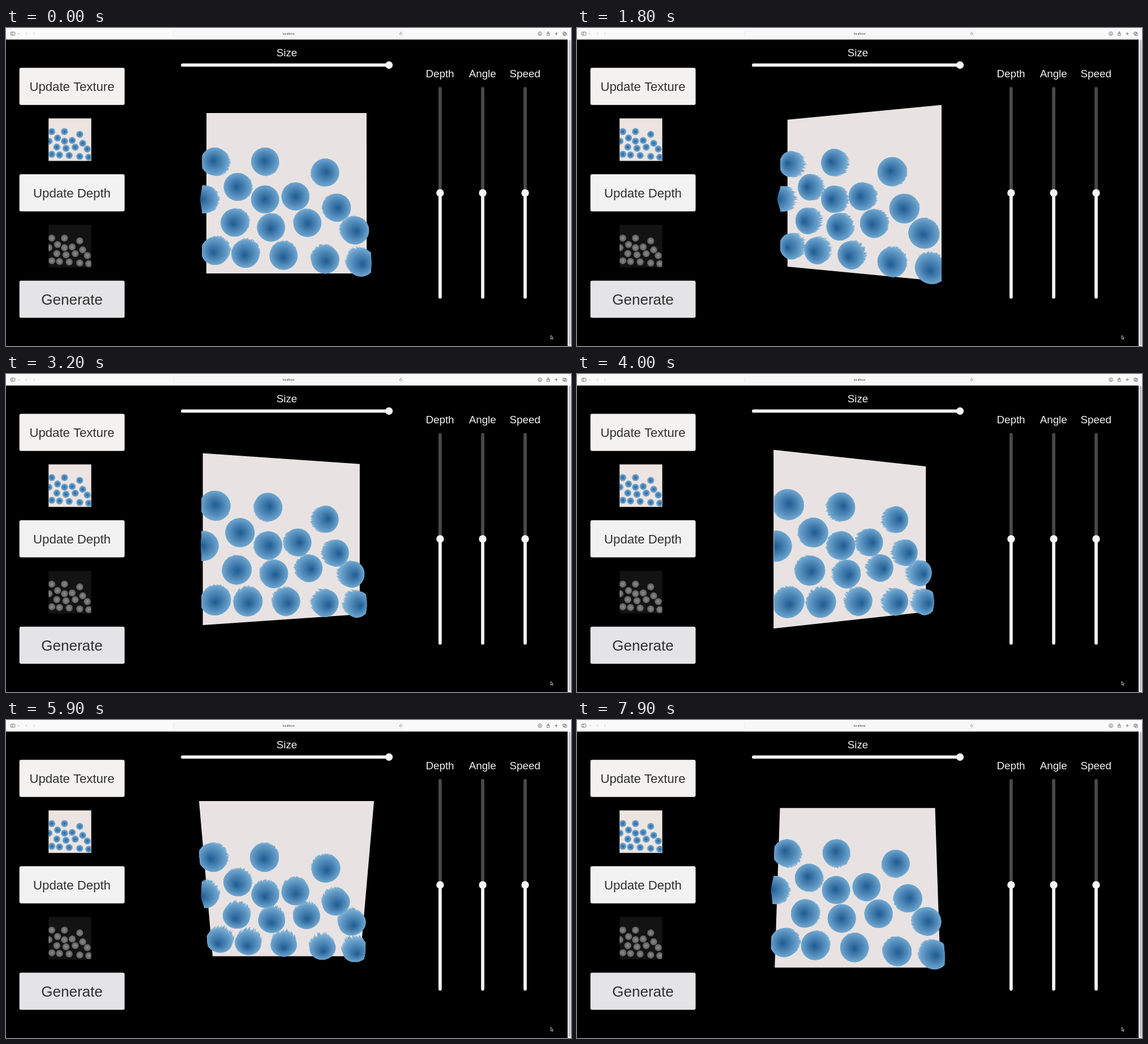
An HTML page with a canvas for the animation above (8000 ms loop, 998x561 px).

```html
<!DOCTYPE html>
<html lang="en">
<head>
<meta charset="utf-8">
<title>Depth viewer</title>
<style>
html, body { margin: 0; width: 998px; height: 561px; overflow: hidden; background: #000; }
canvas { display: block; width: 998px; height: 561px; }
</style>
</head>
<body>
<canvas id="stage" width="998" height="561"></canvas>
<script>
const ctx = document.getElementById('stage').getContext('2d');
const LOOP = 8000, STEP = 100;
const CX = 495.5, CY = 291.4;   // projection centre
const HALF = 141.5, CAM = 468;  // plane half size, camera distance
const R = 23.4, RIM = 23, TOP = 35;
const SWING = 20, PERIOD = 5000, START = 148;
const RINGS = 18, SIDES = 96;
const INNER = [30, 90, 145], OUTER = [108, 164, 206];
const FONT = '"Liberation Sans", Arial, sans-serif';

// dot centres on the plane, relative to its middle
const DOTS = [
  [-36, -53], [-120.5, -53], [65, -34.6], [-82, -10.5], [-139, 10.5],
  [-36, 10.5], [15, 5.5], [84.6, 24.4], [-87, 49.5], [-26, 57.7],
  [35, 50], [115, 62.6], [-120, 97], [-69, 101.7], [-5, 105],
  [65, 111.4], [125, 116.3]
];

const rad = d => d * Math.PI / 180;
const clamp = v => Math.max(-HALF, Math.min(HALF, v));
const mix = (a, b, k) => `rgb(${a.map((v, i) => Math.round(v + (b[i] - v) * k))})`;
const noise = n => { const s = Math.sin(n * 12.9898) * 43758.5453; return s - Math.floor(s); };

function pose(t) {
  const swing = from => rad(SWING) * Math.sin((t - from) / PERIOD * 2 * Math.PI);
  if (t < START) return { yaw: 0, pitch: rad(-0.2) };
  if (t < START + PERIOD) return { yaw: swing(START), pitch: 0 };
  return { yaw: 0, pitch: swing(START + PERIOD) };
}

// returns a function mapping plane coordinates to [screen x, screen y, nearness]
function projector({ yaw, pitch }) {
  const cy = Math.cos(yaw), sy = Math.sin(yaw);
  const cp = Math.cos(pitch), sp = Math.sin(pitch);
  return (x, y, z) => {
    const x1 = x * cy - z * sy, z1 = x * sy + z * cy;
    const y1 = y * cp + z1 * sp, z2 = z1 * cp - y * sp;
    const k = CAM / (CAM - z2);
    return [CX + x1 * k, CY + y1 * k, z2];
  };
}

function trace(points) {
  points.forEach(([x, y], i) => i ? ctx.lineTo(x, y) : ctx.moveTo(x, y));
  ctx.closePath();
}

function fillPoly(points, color) {
  ctx.beginPath();
  trace(points);
  ctx.fillStyle = color;
  ctx.fill();
}

function rimPoint([x, y], r, i) {
  const a = i / SIDES * 2 * Math.PI;
  return [clamp(x + r * Math.cos(a)), clamp(y + r * Math.sin(a))];
}

// ragged side wall hanging from the rim of a dot
function skirt(dot, project, seed, low, high, color) {
  ctx.beginPath();
  for (let i = 0; i < SIDES; i++) {
    const z = RIM * (low + (high - low) * noise(seed * 101 + i));
    const a = rimPoint(dot, R, i), b = rimPoint(dot, R, i + 1);
    trace([project(...a, RIM), project(...b, RIM), project(...b, z), project(...a, z)]);
  }
  ctx.fillStyle = color;
  ctx.fill();
}

function drawDot(dot, project, seed) {
  skirt(dot, project, seed, 0.15, 0.75, '#a3c1d8');
  skirt(dot, project, seed, 0.35, 0.95, '#74a8cf');
  for (let n = 0; n < RINGS; n++) {
    const k = 1 - n / RINGS;
    const z = TOP + (RIM - TOP) * k;
    const ring = [];
    for (let i = 0; i < SIDES; i++) ring.push(project(...rimPoint(dot, R * k, i), z));
    fillPoly(ring, mix(INNER, OUTER, k));
  }
}

function drawRelief(t) {
  const project = projector(pose(t));
  const corners = [[-1, -1], [1, -1], [1, 1], [-1, 1]];
  fillPoly(corners.map(([x, y]) => project(x * HALF, y * HALF, 0)), '#e8e3e2');
  DOTS.map((dot, i) => ({ dot, i, near: project(...dot, 0)[2] }))
    .sort((a, b) => a.near - b.near)
    .forEach(({ dot, i }) => drawDot(dot, project, i + 1));
}

function box(x, y, w, h, r, color) {
  ctx.beginPath();
  ctx.roundRect(x, y, w, h, r);
  ctx.fillStyle = color;
  ctx.fill();
}

function disc(x, y, r, color) {
  ctx.beginPath();
  ctx.arc(x, y, r, 0, 2 * Math.PI);
  ctx.fillStyle = color;
  ctx.fill();
}

function label(str, x, y, size, color) {
  ctx.font = `${size}px ${FONT}`;
  ctx.textAlign = 'center';
  ctx.fillStyle = color;
  ctx.fillText(str, x, y);
}

function line(points, color, width = 0.8) {
  ctx.beginPath();
  points.forEach(([x, y], i) => i ? ctx.lineTo(x, y) : ctx.moveTo(x, y));
  ctx.strokeStyle = color;
  ctx.lineWidth = width;
  ctx.stroke();
}

function button(str, y, size, base, color) {
  box(23.7, y, 185.8, 65.5, 3, color);
  label(str, 116.5, base, size, '#303030');
}

function thumb(y, back, inner, outer) {
  const k = 75.4 / (2 * HALF);
  ctx.save();
  ctx.beginPath();
  ctx.rect(75.2, y, 75.4, 75.2);
  ctx.clip();
  ctx.fillStyle = back;
  ctx.fillRect(75, y, 76, 76);
  for (const [dx, dy] of DOTS) {
    const x = 112.9 + dx * k, cy = y + 37.6 + dy * k;
    const g = ctx.createRadialGradient(x, cy, 0, x, cy, R * k);
    g.addColorStop(0, inner);
    g.addColorStop(1, outer);
    disc(x, cy, R * k, g);
  }
  ctx.restore();
}

function slider(str, x) {
  label(str, x - 0.3, 87.2, 18.8, '#f2f2f2');
  box(x - 2.9, 104, 5.8, 190, 2.9, '#4b484b');
  box(x - 2.9, 291, 5.8, 186.5, 2.9, '#f3f1f1');
  disc(x, 291, 6.7, '#f6f4f4');
}

function drawBrowser() {
  const ink = '#5c5c5c', pale = '#b9b9b9';
  ctx.fillStyle = '#fbfafa';
  ctx.fillRect(0, 0, 998, 20.4);
  box(295, 4.5, 407.5, 11, 3, '#e9e8ea');
  box(295.6, 5.1, 406.3, 9.8, 2.6, '#f8f7f8');
  label('localhost', 499, 11.9, 5.2, '#444');
  ctx.strokeStyle = ink;
  ctx.lineWidth = 0.8;
  ctx.beginPath();
  ctx.roundRect(8.4, 7.2, 7.4, 5.6, 1);
  ctx.roundRect(983.8, 7.2, 4.6, 4.6, 0.8);
  ctx.roundRect(985.6, 8.6, 4.6, 4.6, 0.8);
  ctx.rect(955.6, 9, 4.4, 4.2);
  ctx.moveTo(946.3, 10);
  ctx.arc(943, 10, 3.3, 0, 2 * Math.PI);
  ctx.stroke();
  line([[11, 7.2], [11, 12.8]], ink);
  line([[21.4, 9.5], [22.6, 10.8], [23.8, 9.5]], ink, 0.6);
  line([[37.2, 7.4], [34.6, 10], [37.2, 12.6]], pale);
  line([[48.4, 7.4], [51, 10], [48.4, 12.6]], pale);
  line([[943, 8], [943, 11.6]], ink);
  line([[941.6, 10.4], [943, 11.8], [944.4, 10.4]], ink, 0.6);
  line([[957.8, 11], [957.8, 6.4]], ink);
  line([[956.4, 7.6], [957.8, 6.2], [959.2, 7.6]], ink, 0.6);
  line([[969.2, 10], [974.8, 10]], ink);
  line([[972, 7.2], [972, 12.8]], ink);
  ctx.beginPath();
  ctx.arc(697.3, 10.2, 2, -0.6, 4.8);
  ctx.lineWidth = 0.6;
  ctx.stroke();
  line([[697, 7.3], [698.2, 8.3], [697, 9.2]], ink, 0.6);
  ctx.fillStyle = '#f4f3f3';
  ctx.fillRect(992, 20, 6, 541);
  box(993.7, 21, 3.5, 538, 1.7, '#c2c1c2');
}

function drawCursor() {
  ctx.beginPath();
  trace([[962.2, 542.2], [962.2, 548.6], [963.6, 547.3], [964.6, 549.4],
         [965.6, 548.9], [964.7, 546.9], [966.5, 546.8]]);
  ctx.fillStyle = '#000';
  ctx.fill();
  ctx.strokeStyle = '#e8e8e8';
  ctx.lineWidth = 0.8;
  ctx.stroke();
}

function drawPanel() {
  button('Update Texture', 70.2, 22.1, 111, '#f3f2f1');
  thumb(159.3, '#ebe4e0', '#2363a0', '#7badd3');
  button('Update Depth', 258, 22.2, 299, '#f3f2f2');
  thumb(347.2, '#131313', '#8e8e8e', '#5c5c5c');
  button('Generate', 445.8, 26, 488, '#e4e3e5');
  label('Size', 496, 49.5, 18.8, '#f2f2f2');
  box(309, 62.5, 368, 5.8, 2.9, '#f3f1f1');
  disc(676.5, 65.4, 6.6, '#f6f4f4');
  slider('Depth', 766.8);
  slider('Angle', 842);
  slider('Speed', 917);
}

function render(t) {
  ctx.fillStyle = '#000';
  ctx.fillRect(0, 0, 998, 561);
  drawBrowser();
  drawPanel();
  drawRelief(t);
  drawCursor();
}

const begin = performance.now();
let shown = -1;
function tick() {
  const t = Math.floor((performance.now() - begin) % LOOP / STEP) * STEP;
  if (t !== shown) render(shown = t);
  requestAnimationFrame(tick);
}
tick();
</script>
</body>
</html>
```
